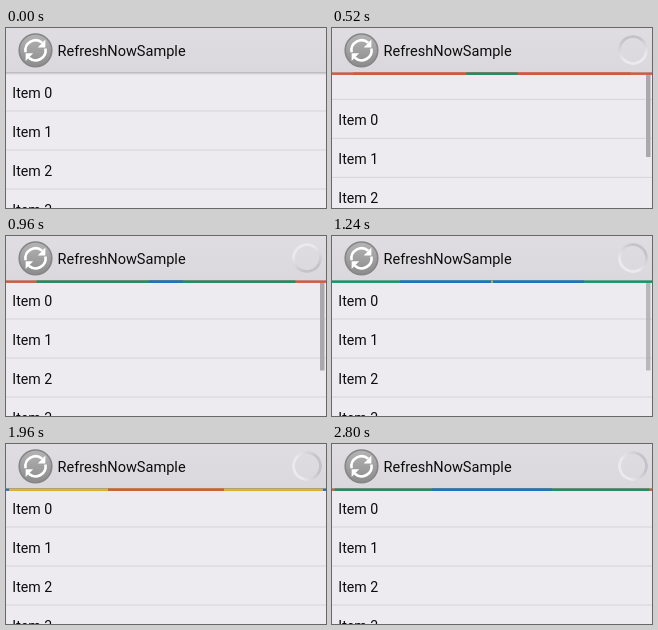
Animation of 320 by 180 pixels, one loop 2.84 s. Source, as an HTML page:

```html
<!DOCTYPE html>
<html lang="en">
<head>
<meta charset="utf-8">
<title>Pull to refresh</title>
<style>
html, body { margin: 0; width: 100%; height: 100%; overflow: hidden; background: #edebf0; }
#stage { position: absolute; left: 0; top: 0; width: 320px; height: 180px; overflow: hidden; }
svg { position: absolute; left: 0; top: 0; }
text { font-family: Roboto, sans-serif; fill: #0c0c0c; }
#ring {
  position: absolute; left: 286px; top: 7px; width: 30px; height: 30px; border-radius: 50%;
  background: conic-gradient(#ebe9ed 15%, #c5c3c8 42%, #c5c3c8 62%, #ebe9ed 85%);
  -webkit-mask: radial-gradient(circle, transparent 11.6px, #000 12.4px);
  mask: radial-gradient(circle, transparent 11.6px, #000 12.4px);
}
</style>
</head>
<body>
<div id="stage">
  <svg width="320" height="180" viewBox="0 0 320 180">
    <defs>
      <linearGradient id="head" x1="0" y1="0" x2="0" y2="1">
        <stop offset="0" stop-color="#dfdde1"/>
        <stop offset="1" stop-color="#dad8dc"/>
      </linearGradient>
      <linearGradient id="edge" x1="0" y1="0" x2="0" y2="1">
        <stop offset="0" stop-color="#b4b2b7"/>
        <stop offset="1" stop-color="#edebf0"/>
      </linearGradient>
      <linearGradient id="disc" x1="0" y1="0" x2="0" y2="1">
        <stop offset="0" stop-color="#b4b4b4"/>
        <stop offset="1" stop-color="#8c8c8c"/>
      </linearGradient>
    </defs>
    <rect width="320" height="180" fill="#edebf0"/>
    <g id="list"></g>
    <rect id="thumb" x="314" y="46" width="4.5" fill="#a9a8ac"/>
    <rect width="320" height="44" fill="url(#head)"/>
    <rect y="44" width="320" height="3" fill="url(#edge)"/>
    <g id="bar"></g>
    <circle cx="29.5" cy="22.3" r="16.3" fill="url(#disc)" stroke="#868686" stroke-width="1.6"/>
    <g id="icon" fill="none" stroke="#fff" stroke-width="2.6"></g>
    <text x="51.5" y="28" font-size="14.55">RefreshNowSample</text>
  </svg>
  <div id="ring"></div>
</div>
<script>
const LOOP = 2840, TICK = 40;
const START = 500;                    // refresh begins
const WAVE = 366, STEP = 417;         // first colour wave, gap between waves
const COLORS = ['#cf5a3c', '#0f9668', '#226fcb', '#f0b31c'];
// time, list offset
const PULL = [[80, 0], [320, 16.5], [480, 27], [600, 28], [720, 23.3], [800, 14], [880, 4], [940, 0]];
// time, half width of the bar as a share
const GROW = [[80, 0], [320, .43], [480, 1]];
const FADE = [[80, 0], [160, 1], [1180, 1], [1440, 0]];

const $ = id => document.getElementById(id);

function add(parent, tag, attrs) {
  const el = document.createElementNS('http://www.w3.org/2000/svg', tag);
  for (const k in attrs) el.setAttribute(k, attrs[k]);
  return parent.appendChild(el);
}

function track(keys, t) {
  if (t <= keys[0][0]) return keys[0][1];
  for (let i = 1; i < keys.length; i++) {
    const [t0, a] = keys[i - 1], [t1, b] = keys[i];
    if (t < t1) return a + (b - a) * (t - t0) / (t1 - t0);
  }
  return keys[keys.length - 1][1];
}

const ease = p => (1 - Math.cos(Math.PI * Math.min(1, Math.max(0, p)))) / 2;

for (let i = 0; i < 4; i++) {
  const y = 44 + 39 * i;
  add($('list'), 'rect', { x: 0, y: y - .5, width: 320, height: 1, fill: '#d5d3d8' });
  add($('list'), 'text', { x: 6.3, y: y + 25.7, 'font-size': 14.2 }).textContent = 'Item ' + i;
}

for (const turn of [0, 180]) {
  const half = add($('icon'), 'g', { transform: `rotate(${turn} 29.5 22.3)` });
  add(half, 'path', { d: 'M19.6 24.2A10.1 10.1 0 0 1 36.2 14.8' });
  add(half, 'path', { d: 'M39.4 11.6V19.4H31.8Z', fill: '#fff', stroke: 'none' });
}

const strips = [0, 1, 2].map(() => add($('bar'), 'rect', { y: 44.5, height: 2.4 }));

function strip(i, share, color) {
  strips[i].setAttribute('x', 160 - 160 * share);
  strips[i].setAttribute('width', 320 * share);
  strips[i].setAttribute('fill', color);
}

function drawBar(t) {
  if (t < START) {
    strip(0, 0, COLORS[1]);
    strip(1, 0, COLORS[1]);
    strip(2, track(GROW, t), COLORS[1]);
    return;
  }
  // the first wave runs slightly ahead
  const age = (t - WAVE + Math.max(0, 900 - t) * .17) / STEP;
  const n = Math.floor(age);
  const tint = k => COLORS[(Math.max(k, -1) + 1) % 4];
  strip(0, 1, tint(n - 2));
  strip(1, ease((age - n + 1) / 2), tint(n - 1));
  strip(2, ease((age - n) / 2), tint(n));
}

function draw(t) {
  const off = track(PULL, t);
  $('list').setAttribute('transform', `translate(0 ${off})`);
  $('thumb').setAttribute('height', 88.5 - off * .2);
  $('thumb').setAttribute('opacity', track(FADE, t));
  drawBar(t);
  $('ring').style.visibility = t < START ? 'hidden' : 'visible';
  $('ring').style.transform = `rotate(${105 - (t - 1480) * .4375}deg)`;
}

const begin = performance.now();
function frame() {
  const t = (performance.now() - begin) % LOOP;
  draw(Math.floor(t / TICK) * TICK);
  requestAnimationFrame(frame);
}
frame();
</script>
</body>
</html>
```
